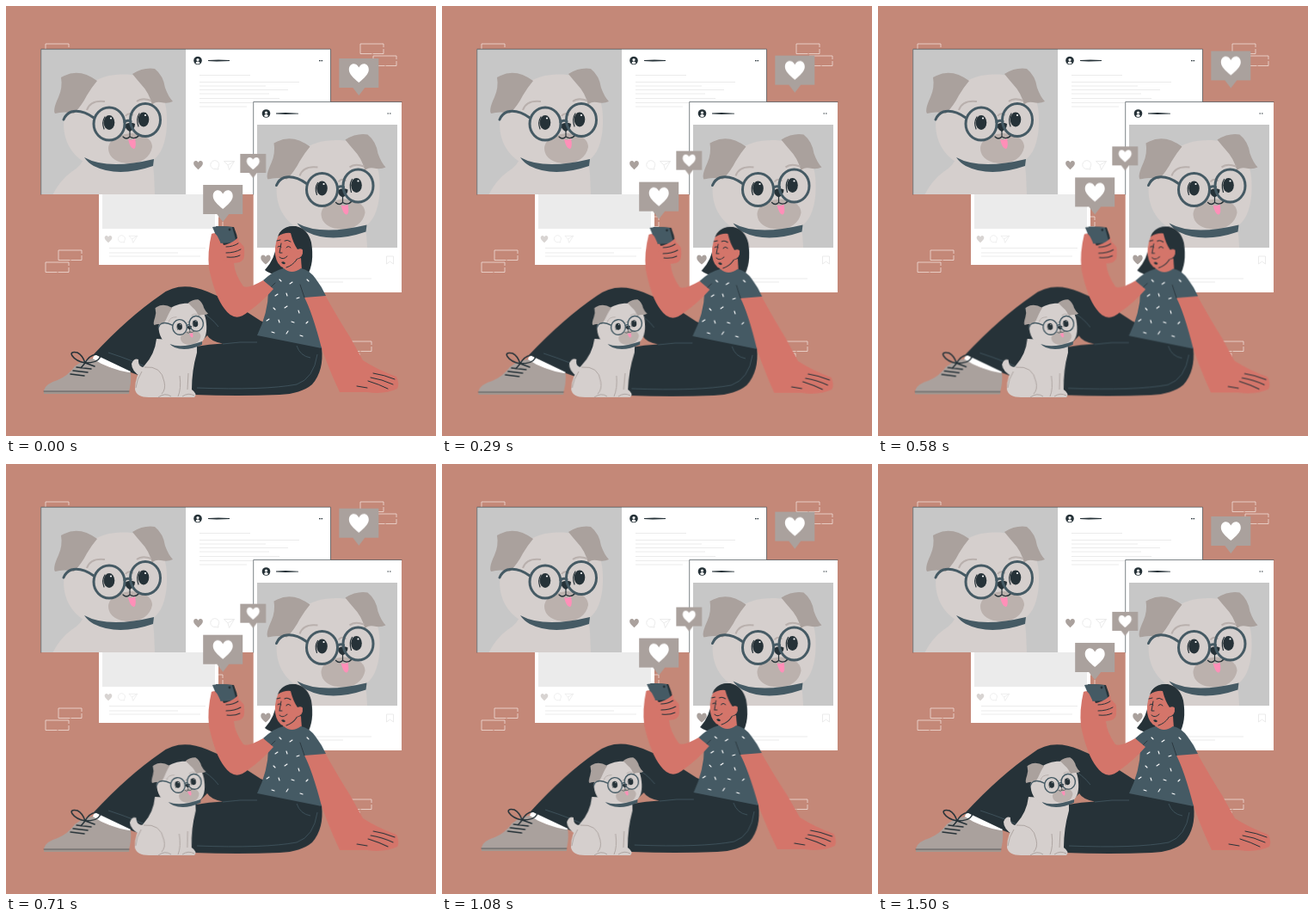
An HTML page without scripts for the animation above (1.54 s loop, 500 by 500 pixels).

```html
<!DOCTYPE html>
<html lang="en">
<head>
<meta charset="utf-8">
<title>Pet posts</title>
<style>
html, body { margin: 0; width: 100%; height: 100%; overflow: hidden; background: #c48878; }
svg { display: block; width: 100vw; height: 100vh; }
.ink { fill: #263238; }
.slate { fill: #455a64; }
.taupe { fill: #aaa19d; }
.fur { fill: #d5cfcd; }
.skin { fill: #d4756a; }
.photo { fill: #c7c7c7; }
.paper { fill: #fff; }
.line { fill: none; stroke: #263238; stroke-linecap: round; stroke-linejoin: round; }
.faint { fill: none; stroke: #e6e6e6; stroke-width: .8; }
.float { animation: float 1540ms cubic-bezier(.37, 0, .63, 1) infinite; }
.lean { transform-origin: 300px 350px; animation: lean 1540ms ease-in-out infinite; }
.sway { transform-origin: 190px 453px; animation: sway 1540ms linear infinite; }
.tail { transform-origin: 157px 428px; animation: wag 1540ms linear infinite; }
@keyframes float {
  46% { transform: translateY(-9.3px); }
}
@keyframes lean {
  0%, 100% { transform: none; }
  22% { transform: translateY(.9px) skewX(-1deg); }
  70% { transform: translateY(-1px) skewX(1.1deg); }
}
@keyframes sway {
  0%, 86%, 100% { transform: none; }
  18.8% { transform: skewX(-2.1deg); }
  30% { transform: skewX(.8deg); }
  46% { transform: skewX(1.6deg); }
  70% { transform: skewX(.6deg); }
}
@keyframes wag {
  0%, 86%, 100% { transform: none; }
  18.8% { transform: rotate(3deg); }
  30%, 46% { transform: rotate(-5deg); }
  70% { transform: rotate(-2deg); }
}
</style>
</head>
<body>
<svg viewBox="0 0 500 500">
  <defs>
    <clipPath id="widePhoto"><path d="M41 50H209V219H41Z"/></clipPath>
    <clipPath id="tallPhoto"><path d="M292 138H455V281H292Z"/></clipPath>
    <path id="heart" d="M0 11C-6 6-11.500 1-11.500-4C-11.500-12-3-13 0-6.500C3-13 11.500-12 11.500-4C11.500 1 6 6 0 11Z"/>
    <path id="brick" d="M0 0H27V11.5H0Z" fill="none" stroke="#f0ddd7" stroke-width=".8" stroke-dasharray="31 2 18 1"/>
    <g id="bubble">
      <path class="taupe" d="M-23-17H23V17H7L0 26L-7 17H-23Z"/>
      <use href="#heart" class="paper"/>
    </g>
    <g id="avatar">
      <circle class="ink" r="4.800"/>
      <path class="paper" d="M-2.5 3Q-2 .8 0 1Q2 .8 2.5 3Q0 5-2.5 3Z"/>
      <circle class="paper" cy="-1" r="1.6"/>
    </g>
    <g id="actions">
      <use href="#heart" transform="scale(.47)"/>
      <path class="faint" d="M20.500 4.500A5 5 0 1 1 23 3L23.500 5ZM30-4.500H42L36 5.500L34.500 0ZM34.500 0L42-4.500"/>
    </g>
    <g id="head">
      <path class="fur" d="M97 92C112 77 146 77 162 84C181 94 188 112 187 135C187 154 182 174 168 181C140 193 108 188 92 182C74 172 64 151 68 128Q76 106 97 92Z"/>
      <path class="taupe" d="M68 81Q86 72 106 87Q100 94 94 104Q88 116 79 125Q68 122 57 125Q54 121 61 106Q66 95 64 83ZM147 79Q160 71 173 73Q183 81 185 95Q189 106 194 111Q188 114 180 112Q173 111 170 115Q166 100 157 91Q151 84 147 79Z"/>
      <path d="M94 121Q98 109 115 111M152 111Q158 106 169 110M139 128Q143 123 148 127" fill="none" stroke="#b9b0ad" stroke-width="2"/>
      <path d="M119 165C120 154 132 150 144 148C157 148 170 153 170 164C168 176 157 183 144 183C130 183 119 177 119 165Z" fill="#bbb1ad"/>
      <path class="line" d="M144 144V152Q140 156 136 152M144 152Q150 156 155 150M114 143Q111 135 115 129M154 140Q151 131 155 125" stroke-width="1.200"/>
      <path d="M142 155Q147 157 150 154Q152 164 149 166Q145 167 142 155Z" fill="#ff8fb8"/>
      <path class="ink" d="M138 138Q144 134 150 137Q150 143 144 146Q139 144 138 138Z"/>
      <g class="ink"><ellipse cx="120" cy="135.500" rx="6.300" ry="8.500"/><ellipse cx="160" cy="132" rx="6.300" ry="8.500"/></g>
      <g class="paper"><circle cx="122" cy="130.500" r="1.100"/><circle cx="162" cy="127" r="1.100"/></g>
      <g fill="none" stroke="#455a64" stroke-width="3">
        <ellipse cx="120" cy="137" rx="18" ry="19"/>
        <ellipse cx="162" cy="132.500" rx="17.500" ry="19"/>
        <path d="M138 135Q141 132 145 134M102 130Q88 120 76 123Q70 125 67 132" stroke-linecap="round"/>
      </g>
      <path class="slate" d="M91 176Q118 191 172 178L171 186Q130 200 102 186Q95 182 91 176Z"/>
    </g>
    <g id="portrait">
      <path class="fur" d="M92 174Q88 186 76 193Q62 203 53 222H173Q173 198 170 176Z"/>
      <use href="#head"/>
    </g>
  </defs>

  <rect width="500" height="500" fill="#c48878"/>
  <use href="#brick" x="46" y="44"/>
  <use href="#brick" x="412" y="44"/>
  <use href="#brick" x="427" y="58"/>
  <use href="#brick" x="61" y="284"/>
  <use href="#brick" x="46" y="298"/>
  <use href="#brick" x="225" y="245"/>
  <use href="#brick" x="398" y="390"/>
  <use href="#brick" x="384" y="404"/>

  <g>
    <path class="paper" d="M108 215H247V301H108Z"/>
    <path d="M112 215H243V259H112Z" fill="#ebebeb"/>
    <use href="#actions" fill="#d8d4d2" transform="translate(119 271) scale(.8)"/>
    <path class="faint" d="M120 281.500H232M120 287H200M120 291H226"/>
  </g>

  <g>
    <path class="paper" d="M40.500 50H377.500V219H40.500Z"/>
    <path class="photo" d="M41 50H209V219H41Z"/>
    <use href="#portrait" clip-path="url(#widePhoto)"/>
    <path class="line" d="M40.700 219V50.200H377.500V111" stroke-width=".6"/>
    <use href="#avatar" x="223" y="63.500"/>
    <path class="ink" d="M235 63L247 62.500L260 63V64L245 64.500L235 64ZM364 63h1.600v1.200h-1.600ZM366.500 63h1.600v1.200h-1.600Z"/>
    <path class="faint" d="M225 80.500H284M225 88.500H341M225 93H302M225 97.500H328M225 102H306M225 107.500H318M225 112.500H287M225 117H280"/>
    <use href="#actions" x="223.500" y="185" class="taupe"/>
  </g>

  <g>
    <path class="paper" d="M287.700 111.500H460V333H287.700Z"/>
    <path class="photo" d="M292 138H455V281H292Z"/>
    <g clip-path="url(#tallPhoto)"><use href="#portrait" x="247.500" y="76.500"/></g>
    <path class="line" d="M287.700 219V111.500H460" stroke-width=".6"/>
    <use href="#avatar" x="302.500" y="125"/>
    <path class="ink" d="M314 124.500L325 124L340 124.800V125.500L325 126L314 125.500ZM443.500 124.500h1.500v1h-1.500ZM446 124.500h1.500v1h-1.500Z"/>
    <use href="#heart" class="taupe" transform="translate(302 295) scale(.5)"/>
    <path class="faint" d="M442.500 291H450.500V300L446.500 297L442.500 300ZM340 317H425M340 321H392"/>
  </g>

  <g class="float"><use href="#bubble" x="410.300" y="78"/></g>
  <g class="float"><use href="#bubble" transform="translate(287.300 183) scale(.65)"/></g>
  <g class="float"><use href="#bubble" x="252.200" y="225"/></g>

  <g class="lean">
    <path class="skin" d="M346 337L371 336Q386 363 400 385L415 412Q432 423 454 431Q458 440 455 445Q440 452 420 449L388 449Q373 418 358 372Z"/>
    <path class="line" d="M427 427Q440 429 452 434M424 432Q437 434 450 440M421 436Q434 440 444 445M408 442L420 444" stroke-width="1"/>

    <path class="ink" d="M102 405Q142 362 180 336Q202 319 234 332Q262 343 296 366L367 397Q370 424 356 440Q343 451 318 452Q270 454 218 452L145 426Z"/>
    <path d="M221 396L234 383Q238 390 252 392.500Q236 393 221 396Z" fill="#c48878"/>
    <path d="M119 403Q150 413 172 424M222 444Q300 447 338 440Q358 433 362 405M338 395Q342 407 354 409M247 373Q238 361 222 353M252 393Q272 390 292 391" fill="none" stroke="#455a64" stroke-width=".8"/>

    <path class="paper" d="M103 405L145 425L142 429L100 412Z"/>
    <path class="taupe" d="M44 447Q46 439 60 435Q72 430 80 419Q90 411 101 410Q118 422 145 426.500Q146 440 142 451H44Z"/>
    <path d="M44 448H143V451H44Z" fill="#a0968f"/>
    <path class="line" d="M44 448H143" stroke-width=".6"/>
    <path class="line" d="M92 415C77 412 70 400 83 403Q89 406 92 415C99 402 112 404 109 409Q106 415 92 415L103 419M92 415L87 421M82 420L99 422M78 424L95 426M75 428L91 430" stroke-width="1.500"/>

    <path class="ink" d="M318 264Q325 255 337 256Q351 259 355 275Q359 299 350 314Q338 310 332 303L323 312Q309 314 301 307Q313 294 314 278Z"/>
    <path class="skin" d="M323 300L343 293L344 308Q334 323 321 313Z"/>
    <path class="skin" d="M319 263Q312 274 313 289Q315 302 323 304.500Q332 304 338 294Q346 292 345 284Q344 279 339 282L335 268L327 259Z"/>
    <path class="ink" d="M316 268Q321 256 334 256Q350 258 354 277L348 289Q346 280 339 283Q334 276 331 264Q324 263 316 268Z"/>
    <path class="line" d="M315 273L319 272M324 273Q327 271 331 274M316 280Q318 278 320 280M326 281Q328 278 331 281M320 276L318 287H321M318 292Q322 296 327 291M326 304Q333 302 338 295" stroke-width="1"/>
    <path class="ink" d="M320 298Q323 296 325 299Q323 302 320 298Z"/>

    <path class="slate" d="M299 319Q312 307 323 305Q332 313 343 305Q353 307 360 317Q367 326 372 337L347 339Q356 356 367 398L292 383Q305 356 305 331Z"/>
    <path class="line" d="M347 339L342 324M305 331Q309 325 313 322" stroke-width=".8"/>
    <path d="M318 318l2 2M333 321l-3 2M350 318l2 2M313 337l3-2M326 334l1 3M338 340l3-1M311 351l2 2M324 351l3-2M340 354l1 3M303 366l3-2M317 365l1 3M332 367l3 1M349 369l2-2M309 379l3 1M326 381l2-3M342 383l3 1" stroke="#fff" stroke-width="1.100" stroke-linecap="round"/>

    <path class="skin" d="M239 265Q234 286 236 305Q243 338 254 352Q266 369 281 356Q297 345 311 329L299 319Q282 329 276 326Q266 312 265 299Q277 298 277 291Q279 279 270 273L251 270L244 264Z"/>
    <path class="ink" d="M244 256L265 257Q269 266 270 275L253 278Z"/>
    <path class="slate" d="M240 257Q251 255 263 257L268 275L248 276Z"/>
    <circle class="ink" cx="260" cy="260" r="1.400"/>
    <path class="skin" d="M239 265Q244 263 247 270Q252 279 250 285L257 277Q264 275 270 269Q272 275 266 279L273 277Q279 279 276 286Q278 294 271 298L250 295L239 284Z"/>
    <path class="line" d="M256 280Q264 280 270 276M256 287Q266 287 273 283M257 292Q266 293 272 290" stroke-width="1"/>
  </g>

  <g class="sway">
    <path class="tail fur" d="M163 420Q153 421 154 411Q149 409 146 416Q146 425 157 431Z"/>
    <path class="fur" d="M175 387Q173 405 161 418Q150 429 150 446Q152 455 166 455H219Q223 451 216 446Q216 424 222 403V390Z"/>
    <path d="M161 420Q181 418 184 437Q186 446 181 451M177 455Q185 449 192 454M202 430Q204 445 200 454M212 427L211 446M151 444Q152 434 158 425M205 454Q212 449 219 453" fill="none" stroke="#aaa19d" stroke-width=".9"/>
    <use href="#head" transform="translate(202 373) rotate(-6) scale(.465) translate(-120 -136)"/>
  </g>
</svg>
</body>
</html>
```
